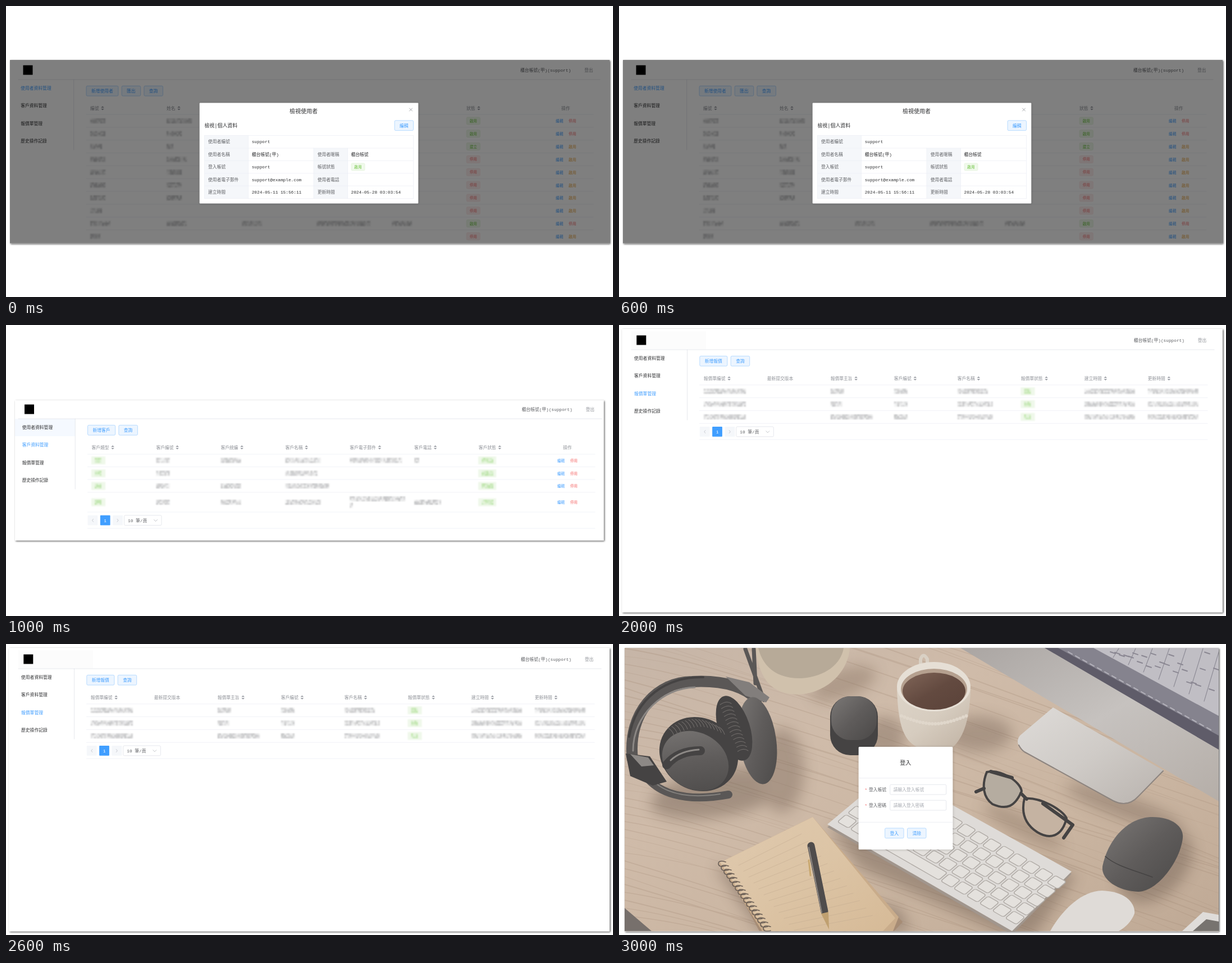
Write an HTML page that moves like this. It is 1081 px wide and 518 px high and loops after 4 s.

```html
<!DOCTYPE html>
<html>
<head>
<meta charset="utf-8">
<style>
html, body { margin: 0; width: 100%; height: 100%; overflow: hidden; background: #fff; }
svg { display: block; }
text { font-family: "Liberation Mono", "Noto Sans CJK TC", "Noto Sans CJK", monospace; }
.sans text { font-family: "Noto Sans CJK TC", "Noto Sans CJK", sans-serif; }
</style>
</head>
<body>
<svg id="stage" width="1081" height="518" viewBox="0 0 1081 518"></svg>
<script>
const BLUE = '#409eff', GREEN = '#67c23a', RED = '#f56c6c', ORANGE = '#e6a23c';
const DARK = '#303133', GRAY = '#606266', PALE = '#909399', LINE = '#ebeef5';
const FS = 7.78, SMALL = 6.67;
const USER = '櫃台帳號(甲)', LOGIN = 'support';

let seed = 7;
const rnd = () => (seed = seed * 16807 % 2147483647) / 2147483647;
const list = (n, f) => Array.from({ length: n }, (_, i) => f(i)).join('');

const rect = (x, y, w, h, fill, more = '') =>
  `<rect x="${x}" y="${y}" width="${w}" height="${h}" fill="${fill}" ${more}/>`;
const box = (x, y, w, h, fill, stroke, rx = 2) =>
  rect(x, y, w, h, fill, `stroke="${stroke}" stroke-width=".7" rx="${rx}"`);
const path = (d, fill, more = '') => `<path d="${d}" fill="${fill}" ${more}/>`;
const stroke = (d, color, w) =>
  path(d, 'none', `stroke="${color}" stroke-width="${w}" stroke-linecap="round" stroke-linejoin="round"`);
const oval = (x, y, rx, ry, fill, turn = 0) =>
  `<ellipse cx="${x}" cy="${y}" rx="${rx}" ry="${ry}" fill="${fill}" transform="rotate(${turn} ${x} ${y})"/>`;
const hline = (x1, x2, y, color = LINE) => stroke(`M${x1} ${y}H${x2}`, color, .7);
const vline = (x, y1, y2, color = LINE) => stroke(`M${x} ${y1}V${y2}`, color, .7);

// y is the vertical centre of the text
const text = (x, y, s, fill = GRAY, size = FS, more = '') =>
  `<text x="${x}" y="${y + size * .37}" font-size="${size}" fill="${fill}" ${more}>${s}</text>`;
const middle = (x, y, s, fill, size) => text(x, y, s, fill, size, 'text-anchor="middle"');

const button = (x, y, w, s) =>
  box(x, y, w, 17.8, '#ecf5ff', '#a0cfff') + middle(x + w / 2, y + 9, s, BLUE);
const tag = (x, y, s, color) => {
  const [fill, edge] = color === RED ? ['#fef0f0', '#fde2e2'] : ['#f0f9eb', '#e1f3d8'];
  return box(x, y - 6.5, 24, 13, fill, edge) + middle(x + 12, y, s, color, SMALL);
};
const sorter = (x, y) =>
  path(`M${x - 2.8} ${y - .7}l2.8 -2.8 2.8 2.8zM${x - 2.8} ${y + 1}l2.8 2.8 2.8 -2.8z`, '#999ca3');
const heading = (x, y, s, sorted = true) =>
  text(x, y, s, PALE) + (sorted ? sorter(x + s.length * FS + 6.4, y) : '');

// pixelated, unreadable text
const smudge = (x, y, w, color = '#606266') => `<g filter="url(#soft)">` +
  list(Math.round(w / 3) * 3, i => rect(x + (i / 3 | 0) * 3, y - 4.5 + i % 3 * 3, 3, 3, color,
    `opacity="${(.06 + rnd() * .32).toFixed(2)}"`)) + '</g>';
const smudgedTag = (x, y, w) =>
  rect(x, y - 7, w, 14, '#eff8ea', 'filter="url(#soft)"') + smudge(x + 6, y, w - 12, GREEN);

const sheet = (x, y, w, h, fill = '#fff') => rect(x, y, w, h, fill, 'filter="url(#drop)"');

// header, menu and buttons around a corner: x of the content, y of the header line
function frame(x, y, active, right, buttons) {
  const menu = ['使用者資料管理', '客戶資料管理', '報價單管理', '歷史操作記錄'];
  let bx = x;
  return hline(22, right, y, '#dcdfe6') + rect(x - 112.5, y - 25.5, 17, 17, '#000') +
    text(x + 773, y - 17.3, `${USER}(${LOGIN})`, GRAY) + text(x + 887, y - 17.3, '登出', PALE) +
    vline(x - 22.3, y, y + 125, '#dcdfe6') +
    menu.map((s, i) => text(x - 116.7, y + 15.4 + i * 31.2, s, i === active ? BLUE : DARK)).join('') +
    buttons.map(s => {
      const w = s.length * FS + 18, b = button(bx, y + 11.3, w, s);
      bx += w + 6.2;
      return b;
    }).join('');
}

function pager(x, y) {
  const arrow = (ax, d) => stroke(`M${ax - d} ${y + 6.5}l${2 * d} 2.5 ${-2 * d} 2.5`, '#b4b7bd', .7);
  return rect(x, y, 17.8, 17.8, '#f5f7fa', 'rx="1"') + rect(x + 22.3, y, 17.8, 17.8, BLUE, 'rx="1"') +
    rect(x + 44.8, y, 17.8, 17.8, '#f5f7fa', 'rx="1"') + arrow(x + 9, -1) + arrow(x + 53.5, 1) +
    middle(x + 31.2, y + 9, '1', '#fff') + box(x + 65, y, 66.5, 17.8, '#fff', '#dcdfe6') +
    text(x + 71.5, y + 9, '10 筆/頁') + stroke(`M${x + 118} ${y + 7.7}l3 3 3 -3`, '#a8abb2', .7);
}

function dialog() {
  const ys = [230.5, 253, 275.4, 297.8, 320.2, 342.7];
  const left = [['使用者編號', LOGIN], ['使用者名稱', USER], ['登入帳號', LOGIN],
    ['使用者電子郵件', LOGIN + '@example.com'], ['建立時間', '2024-05-11 15:56:11']];
  const right = [null, ['使用者暱稱', '櫃台帳號'], ['帳號狀態', ''], ['使用者電話', ''],
    ['更新時間', '2024-05-28 03:03:54']];
  return rect(344.7, 172.5, 389.5, 179, '#fff', 'rx="1" filter="url(#lift)"') +
    middle(530, 187, '檢視使用者', DARK, 10) +
    stroke('M718.5 182l5 5m0 -5l-5 5', PALE, .8) +
    text(353.5, 212.5, '檢視|個人資料', DARK, 8.9, 'font-weight="500"') + button(692, 203.8, 33.5, '編輯') +
    rect(353.5, 230.5, 78, 112.2, '#f5f7fa') + rect(548, 253, 60.5, 89.7, '#f5f7fa') +
    ys.map(y => hline(353.5, 725.5, y)).join('') +
    [353.5, 431.5, 725.5].map(x => vline(x, 230.5, 342.7)).join('') +
    [548, 608.5].map(x => vline(x, 253, 342.7)).join('') +
    left.map(([k, v], i) => text(360, ys[i] + 11, k) + text(437.7, ys[i] + 11, v, DARK)).join('') +
    right.map((r, i) => r ? text(554.7, ys[i] + 11, r[0]) + text(614.5, ys[i] + 11, r[1], DARK) : '').join('') +
    tag(615, 286.4, '啟用', GREEN);
}

function usersPage() {
  const states = ['啟用', '啟用', '建立', '停用', '停用', '停用', '停用', '停用', '啟用', '停用'];
  const ids = [28, 28, 20, 28, 28, 28, 28, 20, 37, 18];
  const names = [46, 28, 12, 36, 28, 28, 28, 0, 37, 0];
  const row = (s, i) => {
    const y = 204.4 + i * 22.85, on = s === '啟用';
    return smudge(150, y, ids[i]) + smudge(286, y, names[i]) +
      tag(820.3, y, s, s === '停用' ? RED : GREEN) + text(979, y + .5, '編輯', BLUE, SMALL) +
      text(1002, y + .5, on ? '停用' : '啟用', on ? RED : ORANGE, SMALL) +
      (i < 9 ? hline(143, 1046, y + 11.4) : '');
  };
  return sheet(7, 96, 1068, 326.5) + frame(143, 131, 0, 1058, ['新增使用者', '匯出', '查詢']) +
    heading(150, 181.7, '編號') + heading(286, 181.7, '姓名') + heading(820, 181.7, '狀態') +
    heading(989, 181.7, '操作', false) + hline(143, 1046, 193) + states.map(row).join('') +
    smudge(420, 387.2, 36) + smudge(553, 387.2, 95) + smudge(687, 387.2, 36) +
    rect(7, 96, 1068, 326.5, '#000', 'opacity=".5"') + dialog();
}

function clientsPage() {
  const cols = [152.5, 267.5, 382.5, 497.5, 612.3, 727, 841.7];
  const heads = ['客戶類型', '客戶編號', '客戶統編', '客戶名稱', '客戶電子郵件', '客戶電話', '客戶狀態'];
  const widths = [[24, 37, 62, 94, 10], [24, 0, 56, 0, 0], [24, 37, 78, 0, 0], [24, 37, 62, 0, 47]];
  const ys = [241, 264, 286.5, 315.5];
  return sheet(16, 134, 1048.5, 249.5) + rect(16, 167, 107, 31, '#f5f9ff') +
    frame(145.5, 167, 1, 1061, ['新增客戶', '查詢']) +
    heads.map((s, i) => heading(cols[i], 217.7, s)).join('') + heading(992, 217.7, '操作', false) +
    [230, 252.5, 275, 297.7, 333, 362].map(y => hline(145.5, 1049, y)).join('') +
    ys.map((y, r) => smudgedTag(152, y, 25) + smudgedTag(841, y, 32) +
      widths[r].map((w, i) => smudge(cols[i + 1], y, w)).join('') +
      text(981.7, y + .5, '編輯', BLUE, SMALL) + text(1004.7, y + .5, '停用', RED, SMALL)).join('') +
    smudge(612, 309.5, 98) + smudge(612, 321, 6) + pager(145.5, 338.8);
}

function quotesPage() {
  const heads = ['報價單編號', '最新提交版本', '報價單主旨', '客戶編號', '客戶名稱', '報價單狀態', '建立時間', '更新時間'];
  const widths = [[76, 0, 23, 23, 55, 0, 89, 89], [76, 0, 20, 23, 62, 0, 89, 89], [74, 0, 75, 23, 62, 0, 89, 89]];
  const col = i => 150.8 + i * 113;
  return sheet(5.5, 7, 1069.5, 504.5) + rect(22, 11, 133, 32, '#fcfcfc') +
    frame(143.8, 44, 2, 1060, ['新增報價', '查詢']) +
    heads.map((s, i) => heading(col(i), 95, s, i !== 1)).join('') +
    [106.7, 129.5, 152.3, 175.3, 204].map(y => hline(143.5, 1048, y)).join('') +
    widths.map((row, r) => row.map((w, i) => smudge(col(i), 118 + r * 22.8, w)).join('') +
      smudgedTag(715.5, 118 + r * 22.8, 25)).join('') + pager(143.8, 181);
}

function desk() {
  const ink = '#5a5756', deep = '#454343';
  const shadows = '<g filter="url(#haze)" opacity=".45">' +
    oval(180, 265, 125, 42, '#6d5b50', -10) + oval(290, 225, 40, 75, '#7d695c') +
    oval(472, 165, 38, 36, '#7d695c') + oval(400, 70, 60, 26, '#8a7464', -20) +
    oval(640, 160, 60, 32, '#7d695c') + oval(955, 395, 78, 52, '#6d5b50', -45) +
    oval(720, 325, 80, 18, '#8a7464', 28) + oval(900, 290, 110, 20, '#7d695c', 20) +
    path('M371 326L430 400 690 518H740L815 410Z', '#6d5b50') + path('M170 395L250 511H520L500 470Z', '#6d5b50') + '</g>';
  const monitor = path('M608 7H1068V280Z', 'url(#metal)') + path('M758 7H1068V188Z', '#5f5c69') +
    path('M782 7H1068V163Z', '#85838e') + path('M845 7H1068V128Z', '#c0bec4') +
    list(7, i => stroke(`M${890 + i * 30} 8l${-10 - i * 3} ${16 + i * 13}`, '#8f8d97', 1.2)) +
    list(24, i => stroke(`M${875 + i * 8} ${14 + rnd() * i * 3.2}l9 3`, '#8a8792', 2)) +
    list(20, i => stroke(`M${800 + i * 13} ${14 + i * 7.1}l7 4`, '#b3b1ba', 2)) +
    path('M773 113L714 163Q703 178 722 191L880 278Q906 291 925 270L970 225Z', 'url(#foot)') +
    stroke('M712 180Q716 188 722 192L880 279Q906 292 925 271L969 226', '#8d8580', 2);
  const phones = stroke('M24 205C15 120 70 67 130 67C190 64 225 78 245 98', ink, 20) +
    stroke('M25 190C25 125 80 78 135 77', '#8b8784', 3) + stroke('M18 165C30 95 85 58 150 59', deep, 4) +
    stroke('M225 9L258 100M240 9L243 70', ink, 7) + path('M190 58L232 68 268 95 262 104 225 92Z', '#827e7c') +
    oval(247, 172, 33, 78, 'url(#leather)', -8) + oval(205, 150, 28, 60, deep, -18) +
    list(13, i => stroke(`M${180 + i * 2.5} ${108 + i * 7}q12 -8 20 -2`, '#6d6967', 1.2)) +
    oval(142, 196, 72, 64, deep, 30) + oval(136, 208, 62, 50, 'url(#leather)', 30) +
    list(16, i => stroke(`M${88 + i * 6} ${150 - 16 * Math.sin(i / 15 * 3)}q7 4 10 13`, '#6d6967', 1.2)) +
    stroke('M40 222C62 268 120 282 195 268', ink, 14) + stroke('M48 228C72 266 120 276 180 267', '#83807d', 2) +
    stroke('M85 215Q105 190 145 190', deep, 16) + stroke('M92 207Q110 190 142 188', '#8d8986', 3) +
    path('M12 195L55 200 85 245 60 252 20 235Z', deep) + path('M20 196L52 202 62 216 40 218Z', '#8d8986');
  const cup = stroke('M537 42V27Q542 14 549 27V42', '#d9d0c4', 6) +
    path('M495 80C497 140 505 170 530 183H595C615 165 625 130 626 80Z', 'url(#china)') +
    oval(560.5, 76, 65.5, 44, '#e6dfd5') + oval(561, 80, 59, 36, '#b5a08f') + oval(561, 84, 56, 33, 'url(#coffee)') +
    list(22, i => oval(503 + i * 5.5, 128 + 14 * Math.sin(i / 21 * Math.PI), 3, 3, '#e0d7cb'));
  const keys = list(70, i => {
    const c = i % 14, r = i / 14 | 0;
    if (!r && c > 3 && c < 8) return '';
    return rect(c + .3, r + .6, !r && c === 3 ? 4.85 : .85, .82, '#e4e1dd',
      'stroke="#b0aba6" stroke-width=".06" rx=".15"');
  });
  const keyboard = path('M371 326L485 230L806 409L700 517Z', '#a1968d') +
    path('M371 321L485 226L806 405L700 511Z', '#dedbd8') +
    `<g transform="matrix(23 13.2 18.5 -15.8 371 322)">${keys}</g>`;
  const notebook = path('M190 400L350 315L505 495L490 511H250Z', '#a68c75') +
    path('M178 390L345 308L498 486L488 511H255Z', '#c9ac8b') +
    path('M180 389L345 308L492 488L470 511H262Z', 'url(#paper)') +
    list(12, i => stroke(`M${213 + i * 9} ${394 + i * 10.5}L${325 + i * 11.5} ${338 + i * 13.2}`, '#c5ae92', .6)) +
    list(17, i => stroke(`M${190 + i * 5} ${388 + i * 7.2}q-13 -4 -13 3t13 4`, '#6b5f56', 1.6)) +
    stroke('M342 359L366 476', '#4f4c4c', 13) + stroke('M338 362L361 478', '#8b8581', 2) +
    path('M360 480L373 477 374 508Z', '#c0a070') + stroke('M338 385L341 412', '#c9a86f', 3);
  const glasses = path('M655 228C680 222 715 245 717 262C705 290 690 296 665 285C645 270 648 245 655 228Z',
      '#b5aca0', `stroke="${deep}" stroke-width="4"`) +
    path('M722 275C750 272 790 295 797 310C790 340 770 350 745 335C722 320 716 300 722 275Z',
      '#c5b3a2', `stroke="${deep}" stroke-width="4"`) +
    stroke('M716 266L726 276M636 263L650 257M662 227L700 238M755 284L808 322L792 345', deep, 6);
  const mice =
    path('M861 396C870 350 905 308 950 308C985 308 1006 325 1004 345C1000 385 960 440 925 441C890 440 858 420 861 396Z', 'url(#leather)') +
    stroke('M866 378C885 395 915 402 950 415', deep, 1.5) +
    path('M768 511C785 480 820 440 860 439C900 440 920 460 918 480Q910 500 890 511Z', '#dfdbd7') +
    path('M1003 511L1040 477 1068 482V511Z', '#dfdcd9') + path('M1022 511L1046 490 1068 494V511Z', '#77736f');
  return rect(10, 7, 1058, 504.5, 'url(#wood)') + '<g opacity=".28">' +
    list(60, i => stroke(`M10 ${-300 + i * 14}q260 ${20 + rnd() * 70} 1058 ${320 + rnd() * 60}`, '#a58c78', .5 + rnd() * 1.5)) +
    '</g>' + path('M10 470L58 511H10Z', '#77706c') + shadows + monitor +
    path('M243 7C250 62 270 90 320 90C370 87 408 50 411 7Z', '#d0c1ac') +
    path('M248 7C256 40 280 62 325 61C368 58 396 35 400 7Z', '#b7aa98') + phones +
    rect(376, 93, 85, 105, deep, 'rx="36"') + rect(378, 93, 81, 78, 'url(#leather)', 'rx="34"') +
    cup + keyboard + notebook + glasses + mice;
}

function loginPage() {
  const field = (y, s) => text(438, y + 1, '*', RED) + text(445, y, s) +
    box(482.7, y - 8.8, 100, 17.8, '#fff', '#dcdfe6') + text(488.8, y + .3, '請輸入' + s, '#a8abb2');
  return sheet(10, 7, 1058, 504.5) + `<g clip-path="url(#photo)">${desk()}</g><g class="sans">` +
    rect(426.7, 183, 167.6, 182.7, '#fff', 'rx="1.5" filter="url(#lift)"') +
    middle(510.3, 211, '登入', DARK, 10) + hline(427, 594, 238.7, '#e4e7ed') +
    field(259, '登入帳號') + field(287, '登入密碼') + hline(427, 594, 317.3, '#e4e7ed') +
    button(473.6, 327.8, 33.5, '登入') + button(513.5, 327.8, 33.5, '清除') + '</g>';
}

const shadow = (id, d, blur, a) => `<filter id="${id}" x="-10%" y="-10%" width="120%" height="120%">
  <feDropShadow dx="${d}" dy="${d}" stdDeviation="${blur}" flood-opacity="${a}"/></filter>`;
const blur = (id, size) => `<filter id="${id}"><feGaussianBlur stdDeviation="${size}"/></filter>`;
const gradient = (id, ...colors) => `<linearGradient id="${id}" x2="1" y2="1">` +
  colors.map((c, i) => `<stop offset="${i / (colors.length - 1)}" stop-color="${c}"/>`).join('') + '</linearGradient>';

const stage = document.getElementById('stage');
stage.innerHTML = '<defs>' + shadow('drop', 1.3, 1.5, .7) + shadow('lift', .5, 2, .2) +
  blur('soft', .8) + blur('haze', 12) +
  gradient('wood', '#c6b5a7', '#cfbba9', '#cab5a1', '#bfa995') + gradient('metal', '#aaa5a2', '#c6c2bf', '#b5aea8') +
  gradient('foot', '#dedbd8', '#cfcbc7', '#b9b3ae') + gradient('leather', '#7b7876', '#5f5c5b', '#4b4948') +
  gradient('china', '#ddd4c8', '#d6ccbf', '#c1b3a4') + gradient('coffee', '#806558', '#634a40', '#5a4239') +
  gradient('paper', '#dfc9ae', '#dcc4a5', '#d6ba97') +
  '<clipPath id="photo">' + rect(10, 7, 1058, 504.5, '#000') + '</clipPath></defs>' +
  [usersPage, clientsPage, quotesPage, loginPage].map(p => `<g class="page">${p()}</g>`).join('');

const pages = document.querySelectorAll('.page');
const start = performance.now();
function tick() {
  const now = Math.floor((performance.now() - start) % 4000 / 1000);
  pages.forEach((p, i) => p.setAttribute('display', i === now ? 'inline' : 'none'));
  requestAnimationFrame(tick);
}
tick();
</script>
</body>
</html>
```
